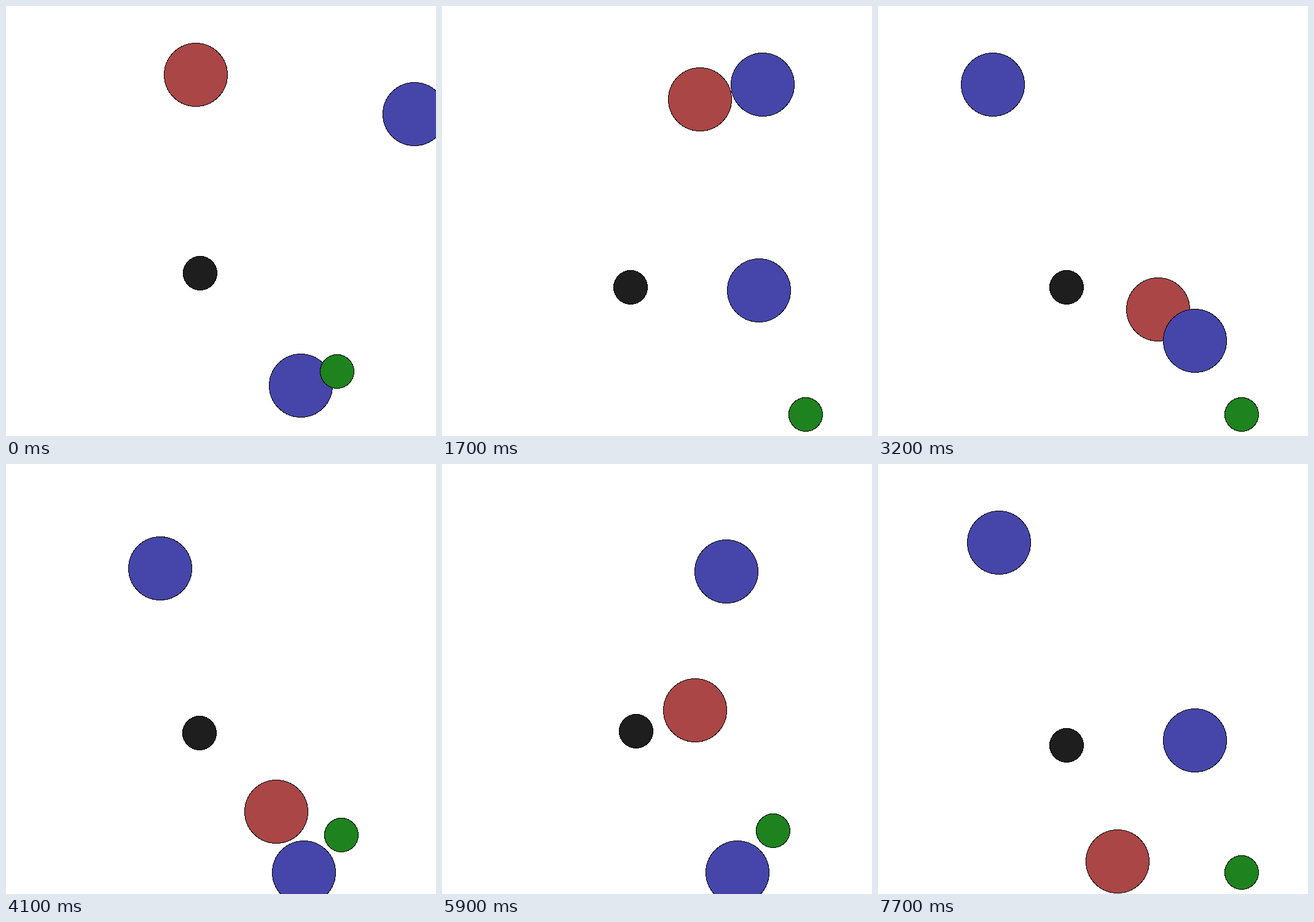
An HTML page that plays this animation: 700 by 700 pixels, repeating every 8 s.

```html
<!DOCTYPE html>
<html lang="en">
<head>
<meta charset="utf-8">
<title>Drifting discs</title>
<style>
  html, body { margin: 0; width: 100%; height: 100%; overflow: hidden; background: #fff; }
  svg { display: block; width: 100vw; height: 100vh; }
  circle { stroke: #000; stroke-width: 1; shape-rendering: crispEdges; }
</style>
</head>
<body>
<svg id="stage" viewBox="0 0 700 700"></svg>
<script>
const LOOP = 8000, FIRST = 500, STEP = 300, STEPS = 25;
const THRUST = 0.0673, DRAG = 0.75;
const DIRS = { L: [-1, 0], R: [1, 0], U: [0, -1], D: [0, 1] };

// Each mover gets one push per step; discs without pushes stay put.
const discs = [
  { x: -0.1645, y: -0.9643, r: 52, fill: '#aa4646', moves: 'RR' + 'D'.repeat(9) + 'UUUUUULDDDDDDU' },
  { x: 1.2805, y: -0.7027, r: 52, fill: '#4646aa', moves: 'L'.repeat(9) + 'R'.repeat(8) + 'L'.repeat(8) },
  { x: 0.531, y: 1.092, r: 52, fill: '#4646aa', moves: 'U'.repeat(5) + 'D'.repeat(9) + 'U'.repeat(9) + 'DD' },
  { x: 0.77, y: 1, r: 28, fill: '#1e821e', moves: '' },
  { x: -0.133, y: 0.348, r: 28, fill: '#1e1e1e', moves: '' }
];

function trace({ x, y, moves }) {
  const path = [[x, y]];
  let vx = 0, vy = 0;
  for (let i = 0; i < STEPS; i++) {
    const [dx, dy] = DIRS[moves[i]] || [0, 0];
    vx = vx * DRAG + dx;
    vy = vy * DRAG + dy;
    x += vx * THRUST;
    y += vy * THRUST;
    path.push([x, y]);
  }
  return path;
}

const stage = document.getElementById('stage');
for (const d of discs) {
  d.path = trace(d);
  d.el = document.createElementNS('http://www.w3.org/2000/svg', 'circle');
  d.el.setAttribute('r', d.r - 0.5);
  d.el.setAttribute('fill', d.fill);
  stage.appendChild(d.el);
}

// The camera zooms so that the farthest coordinate sits at 90% of the half stage.
const toPixel = v => Math.floor(350 + Math.floor(350 * v) * 0.9);

function draw(step) {
  const range = Math.max(...discs.flatMap(d => d.path[step].map(Math.abs)));
  for (const d of discs) {
    const [x, y] = d.path[step];
    d.el.setAttribute('cx', toPixel(x / range));
    d.el.setAttribute('cy', toPixel(y / range));
  }
}

const start = performance.now();
function tick() {
  const t = (performance.now() - start) % LOOP;
  draw(t < FIRST ? 0 : Math.min(STEPS, 1 + Math.floor((t - FIRST) / STEP)));
  requestAnimationFrame(tick);
}
tick();
</script>
</body>
</html>
```
